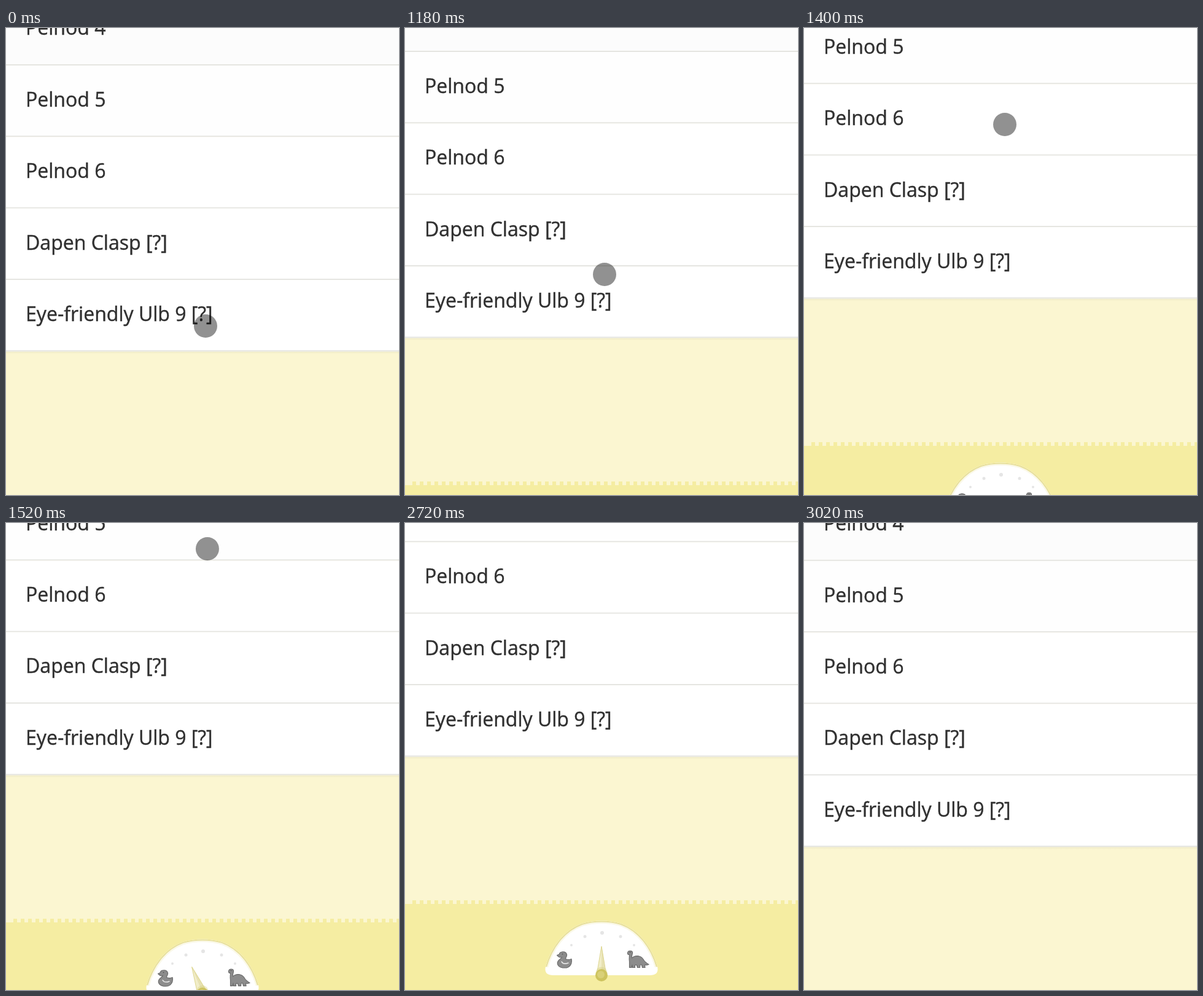
An HTML page for the animation above (3.04 s loop, 640 px wide and 760 px high).

```html
<!DOCTYPE html>
<html lang="en">
<head>
<meta charset="utf-8">
<title>Pull past the end of the list</title>
<style>
html, body { margin: 0; width: 640px; height: 760px; overflow: hidden; background: #fbf6d1; }
svg { display: block; }
text { font: 32px "Open Sans", "Noto Sans", sans-serif; fill: #303030; stroke: #303030; stroke-width: .45px; }
</style>
</head>
<body>
<svg width="640" height="760" viewBox="0 0 640 760">
  <defs>
    <linearGradient id="shade" x1="0" y1="0" x2="0" y2="1">
      <stop offset="0" stop-color="#a8a48c" stop-opacity=".16"/>
      <stop offset="1" stop-color="#a8a48c" stop-opacity="0"/>
    </linearGradient>
    <clipPath id="dialClip"><path id="dialShape" d="M241 736 Q226 736 229 722 C238 691 258 663 288 652 C308 646 332 646 352 652 C382 663 402 691 411 722 Q414 736 399 736 Z"/></clipPath>
    <path id="rim" d="M229 722 C238 691 258 663 288 652 C308 646 332 646 352 652 C382 663 402 691 411 722"/>
  </defs>
  <rect width="640" height="760" fill="#fbf6d1"/>
  <g id="page">
    <g id="list"></g>
    <!-- The footer is laid out as it sits at full pull -->
    <g transform="translate(0 146)">
      <rect y="620" width="640" height="400" fill="#f5eda2"/>
      <path id="teeth" fill="#f5eda2"/>
      <use href="#dialShape" fill="#fff"/>
      <g clip-path="url(#dialClip)" fill="none">
        <use href="#rim" stroke="#faf8e8" stroke-width="9"/>
        <use href="#rim" stroke="#e8e09a" stroke-width="4"/>
      </g>
      <g fill="#e5e5e5">
        <circle cx="271" cy="687" r="2"/>
        <circle cx="293" cy="673" r="2.5"/>
        <circle cx="321" cy="667" r="3"/>
        <circle cx="351" cy="673" r="2.5"/>
        <circle cx="373" cy="687" r="2"/>
      </g>
      <g fill="#8c8c8c" stroke="#6c6c6c" stroke-width="1.2" stroke-linejoin="round" stroke-linecap="round">
        <path d="M247.5 703.5 L251 702 C252 697 262 696 263.500 702.500 C264 706 261 707.500 261.500 709.500 C265 711 268 711 271 709.500 C272.500 717 269 724 260 724 C251 724 246.500 719 249 713.500 C250.500 710 255 709 255.500 706.500 Q251 708 247.500 703.500 Z"/>
        <path d="M255 714 Q258 719 266 716" fill="none" stroke="#e6e6e6" stroke-width="1.5"/>
        <circle cx="256.500" cy="701.500" r=".8" fill="#444" stroke="none"/>
        <path d="M362.500 699.500 C363 695.500 370 695 370.500 699 C370.800 702 368.500 704 369.500 708 C375 702.500 384 704 388 710 C390 714 393 716 397 718.500 Q393 720 390.500 719 L391 723.500 H386.500 L385.500 719 L383 719 L382.500 723.500 H378.500 L377.500 719.500 H374.500 L374.500 723.500 H370.500 L370 719 L369 723.500 H365.500 L365.500 714 C364.500 709 365.500 706 365.500 702.500 Q362 702.500 362.500 699.500 Z"/>
        <circle cx="366.500" cy="698.500" r=".8" fill="#444" stroke="none"/>
      </g>
      <g id="needle">
        <path d="M320 688 L313 730 H320 Z" fill="#f1edc8"/>
        <path d="M320 688 L327 730 H320 Z" fill="#e7e1b2"/>
        <path d="M313 730 L320 689 L327 730" fill="none" stroke="#ded792" stroke-width="1"/>
      </g>
      <circle cx="320" cy="732" r="9.5" fill="#d8cf7c" opacity=".4"/>
      <circle cx="320" cy="736" r="10" fill="#cdc35e"/>
      <circle cx="319" cy="735" r="6" fill="#d9d078"/>
    </g>
  </g>
  <circle id="touch" r="19" fill="#000" fill-opacity=".43"/>
</svg>
<script>
const LOOP = 3040, STEP = 20, PITCH = 116.35, TOP = 61, FULL = 146;
const $ = id => document.getElementById(id);
const clamp = (v, lo, hi) => Math.max(lo, Math.min(hi, v));

function add(parent, tag, attrs, text) {
  const el = document.createElementNS('http://www.w3.org/2000/svg', tag);
  for (const k in attrs) el.setAttribute(k, attrs[k]);
  if (text) el.textContent = text;
  parent.append(el);
  return el;
}

const rows = [
  ['Pelnod 4', '#fcfcfc'],
  ['Pelnod 5', '#fefefe'],
  ['Pelnod 6', '#fff'],
  ['Dapen Clasp [?]', '#fff'],
  ['Eye-friendly Ulb 9 [?]', '#fff']
];
const list = $('list');
add(list, 'rect', { y: TOP + 4 * PITCH, width: 640, height: 4, fill: 'url(#shade)' });
let lastRow;
rows.forEach(([label, fill], i) => {
  const y = TOP + (i - 1) * PITCH;
  lastRow = add(list, 'rect', { y, width: 640, height: PITCH, fill });
  add(list, 'rect', { y: y + PITCH - 2, width: 640, height: 2, fill: '#e5e5e1' });
  add(list, 'text', { x: 32, y: y + 66.8 }, label);
});

let teeth = '';
for (let x = 12; x < 640; x += 12) teeth += `M${x} 614h6v6.500h-6z`;
$('teeth').setAttribute('d', teeth);

// time, pull in px, speed in px/ms
const drag = [[1050, 0, .1], [1180, 22, .26], [1400, 86, .26], [1720, FULL, .04]];

function hermite([t0, p0, v0], [t1, p1, v1], t) {
  const d = t1 - t0, u = (t - t0) / d, w = 1 - u;
  return w * w * (1 + 2 * u) * p0 + u * u * (3 - 2 * u) * p1
       + d * u * w * (w * v0 - u * v1);
}

function pull(t) {
  if (t < 1060) return 0;
  if (t >= 2720) {
    const k = (t - 2720) * .025;
    return (FULL + 1.5) * (1 + k) * Math.exp(-k) - 1.5;
  }
  if (t >= 1720) return FULL;
  const i = drag.findIndex(key => key[0] > t);
  return hermite(drag[i - 1], drag[i], t);
}

function draw(time) {
  const t = Math.floor((time % LOOP) / STEP) * STEP;
  const s = pull(t);
  $('page').setAttribute('transform', `translate(0 ${-s})`);
  const angle = -90 * clamp((FULL - s) / 124, 0, 1);
  $('needle').setAttribute('transform', `rotate(${angle} 320 736)`);
  lastRow.setAttribute('fill', t >= 1000 && t < 1060 ? '#fdfdf1' : '#fff');
  const touch = $('touch');
  touch.setAttribute('cx', 325 + clamp((s - 22) / 32, 0, 3));
  touch.setAttribute('cy', Math.round(485 - 3.815 * s));
  touch.setAttribute('visibility', t < 1720 ? 'visible' : 'hidden');
}

const start = performance.now();
function tick() {
  draw(performance.now() - start);
  requestAnimationFrame(tick);
}
tick();
</script>
</body>
</html>
```
